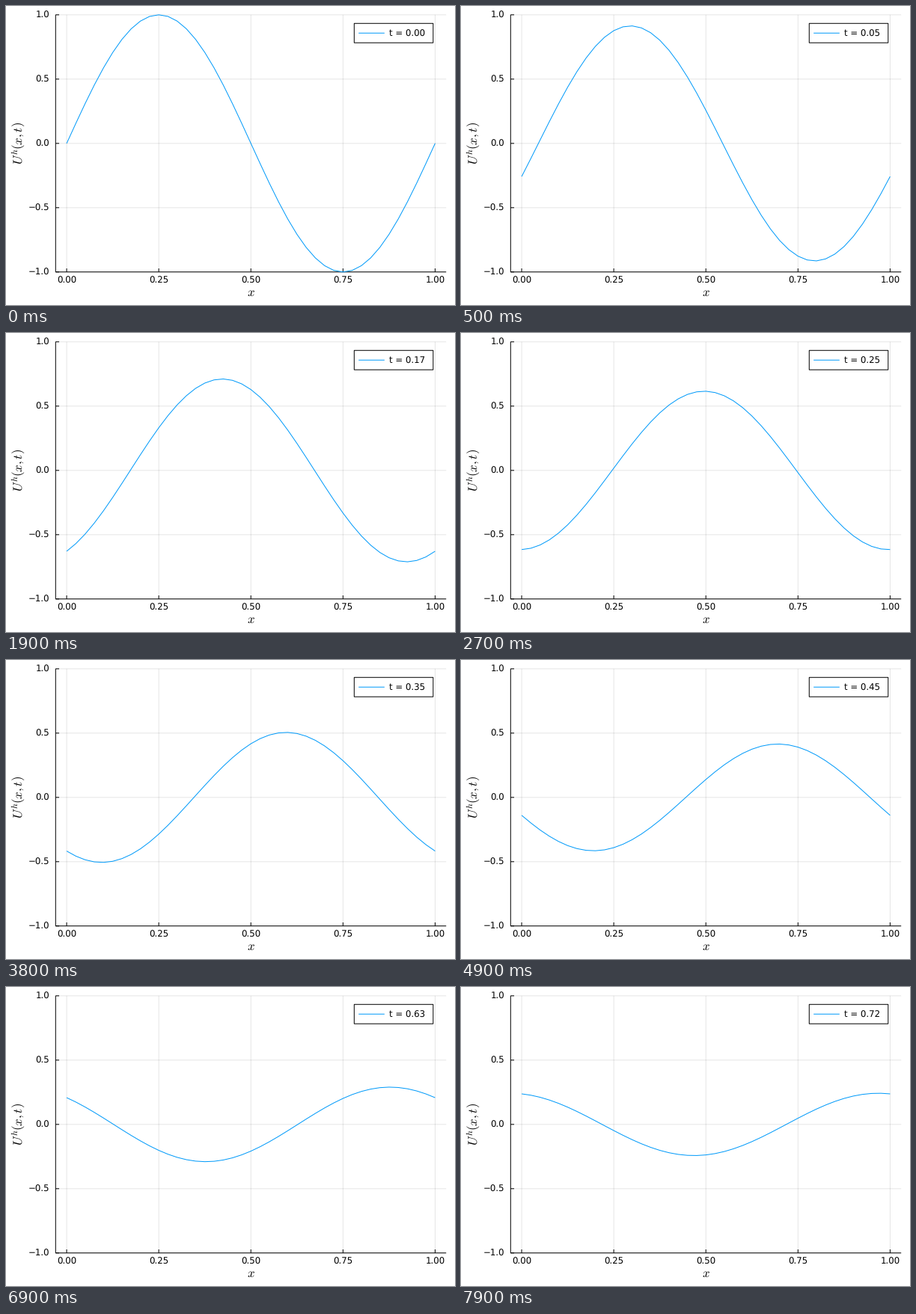
Write a matplotlib script that moves like this. It is 600 by 400 pixels and loops after 8000 ms.

```python
import numpy as np
import matplotlib.pyplot as plt
from matplotlib.animation import FuncAnimation
from matplotlib.patches import Rectangle

W, H, DPI = 600, 400, 100
PX = 72 / DPI                     # one pixel in points
BLUE = "#009afa"
FRAMES, INTERVAL = 80, 100
DT = 1 / 110
SPEED, NU, K = 1.0, 0.05, 2 * np.pi
L, R, T, B = 66.3, 588.19, 11.81, 355.795   # plot area in pixels
TICK = 4.72
SMALL, LARGE = 11.7, 16.9

plt.rcParams.update({
    "font.family": "DejaVu Sans",
    "mathtext.fontset": "cm",
    "text.hinting": "none",
})

# The axes use pixels, measured from the top left.
fig = plt.figure(figsize=(W / DPI, H / DPI), dpi=DPI, facecolor="white")
ax = fig.add_axes([0, 0, 1, 1])
ax.set(xlim=(0, W), ylim=(H, 0))
ax.axis("off")


def px(x):
    return L + (x + 0.03) / 1.06 * (R - L)


def py(u):
    return T + (1 - u) / 2 * (B - T)


def line(xs, ys, color="black", **kw):
    return ax.plot(xs, ys, color=color, lw=PX, snap=False,
                   solid_capstyle="butt", **kw)[0]


def label(x, y, s, size=SMALL, **kw):
    return ax.text(x, y, s, fontsize=size * PX, va="baseline", **kw)


def number(v, digits):
    return f"{v:.{digits}f}".replace("-", "\u2212")


# grid, ticks and axes
for v in np.linspace(0, 1, 5):
    x = px(v)
    line([x, x], [T, B], alpha=0.1)
    line([x, x], [B, B - TICK])
    label(x, 371, number(v, 2), ha="center")
for v in np.linspace(-1, 1, 5):
    y = py(v)
    line([L, R], [y, y], alpha=0.1)
    line([L, L + TICK], [y, y])
    label(58.3, y + 4.25, number(v, 1), ha="right")
line([L, R], [B, B])
line([L, L], [T, B])

label((L + R) / 2, 388.3, "$x$", LARGE, ha="center")
label(21.7, (T + B) / 2, r"$U^h\hspace{-0.08}(x, t)$", LARGE, ha="center",
      rotation=90, rotation_mode="anchor")

grid_x = np.linspace(0, 1, 41)
curve = line([], [], BLUE)

# legend
ax.add_patch(Rectangle((465.3, 23.28), 105.5, 25.92, fc="white", ec="black",
                       lw=PX, snap=False, zorder=3))
line([471.2, 505.8], [36.24, 36.24], BLUE, zorder=4)
clock = label(511.5, 40.8, "", zorder=4)


def update(i):
    t = i * DT
    u = np.exp(-NU * K**2 * t) * np.sin(K * (grid_x - SPEED * t))
    curve.set_data(px(grid_x), py(u))
    clock.set_text(f"t = {t:.2f}")
    return curve, clock


anim = FuncAnimation(fig, update, frames=FRAMES, interval=INTERVAL,
                     repeat=True, repeat_delay=0)
plt.show()
```
